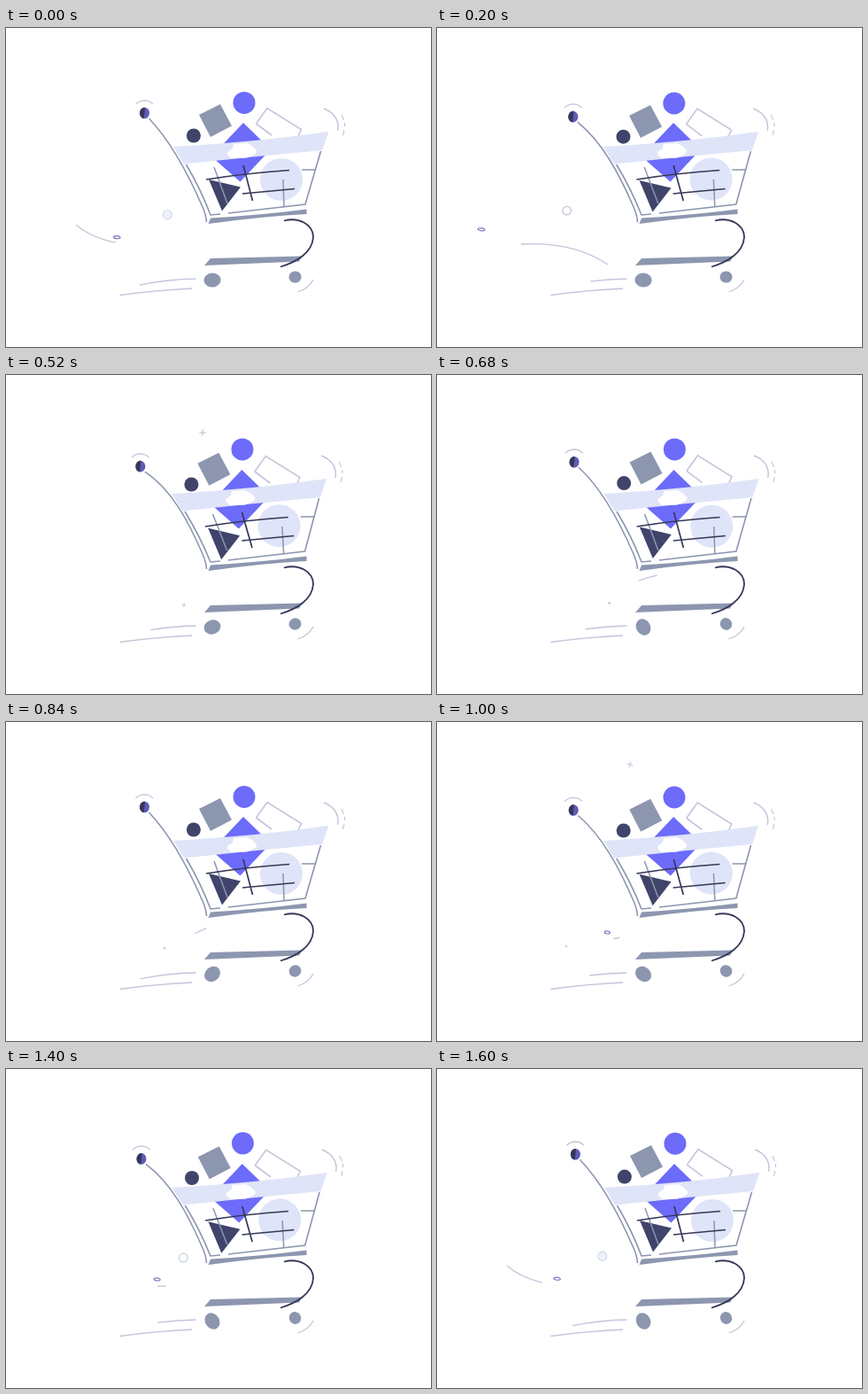
An HTML page with a canvas that plays this animation: 480 by 360 pixels, repeating every 1.64 s.

```html
<!DOCTYPE html>
<html lang="en">
<head>
<meta charset="utf-8">
<title>Rolling cart</title>
<style>
html, body { margin: 0; overflow: hidden; background: #fff }
canvas { display: block }
</style>
</head>
<body>
<canvas id="stage" width="480" height="360"></canvas>
<script>
const ctx = document.getElementById('stage').getContext('2d');
const LOOP = 1640, TAU = Math.PI * 2;
const BLUE = '#6c6bfa', GREY = '#8c96af', DARK = '#40446a', INK = '#353857',
      PALE = '#dfe4f8', LILAC = '#c3c5da';

const fill = (color, d) => { ctx.fillStyle = color; ctx.fill(new Path2D(d)); };
const stroke = (color, width, d) => {
  ctx.strokeStyle = color;
  ctx.lineWidth = width;
  ctx.stroke(new Path2D(d));
};
const ellipse = (x, y, rx, ry = rx, angle = 0, from = 0, to = TAU) => {
  ctx.beginPath();
  ctx.ellipse(x, y, rx, ry, angle, from, to);
};
const disc = (color, ...shape) => { ellipse(...shape); ctx.fillStyle = color; ctx.fill(); };
const ring = (color, width, ...shape) => {
  ellipse(...shape);
  ctx.strokeStyle = color;
  ctx.lineWidth = width;
  ctx.stroke();
};
const at = (x, y, draw) => { ctx.save(); ctx.translate(x, y); draw(); ctx.restore(); };

// Progress since `start`, wrapped around the loop; 1 or more means finished
const life = (t, start, length) => ((t - start + LOOP) % LOOP) / length;
const drift = u => .45 * u ** 2 + .55 * u ** 4;
const pulse = (t, a, b) => t > a && t < b ? Math.sin(Math.PI * (t - a) / (b - a)) : 0;

// keys: [time, from, to], with from and to as fractions of the path
function trail(t, d, length, keys) {
  const i = keys.findIndex(k => k[0] > t);
  if (i < 1) return;
  const [p, q] = [keys[i - 1], keys[i]], u = (t - p[0]) / (q[0] - p[0]);
  const from = p[1] + (q[1] - p[1]) * u, to = p[2] + (q[2] - p[2]) * u;
  if (to - from < .005) return;
  ctx.setLineDash([(to - from) * length, 999]);
  ctx.lineDashOffset = -from * length;
  stroke(LILAC, 1.3, d);
  ctx.setLineDash([]);
  ctx.lineDashOffset = 0;
}

function plus(x, y, size, angle) {
  if (size < .3) return;
  at(x, y, () => {
    ctx.rotate(angle);
    stroke(LILAC, 1.2, `M${-size} 0H${size}M0 ${-size}V${size}`);
  });
}

function particles(t) {
  const late = t < 480 ? t + LOOP : t;
  trail(late, 'M249 226C228 230 215 238 204 244C180 246 155 245 138 245C115 241 95 236 79 222', 184,
    [[640, 0, 0], [680, 0, .12], [1000, .25, .29], [1400, .39, .44],
     [1600, .73, 1], [1640, .7, 1], [1780, 1, 1]]);
  trail(t, 'M193 267C165 248 130 242 95 244', 103, [[60, 0, 0], [190, 0, 1], [240, 0, 1], [400, 1, 1]]);

  const u = life(t, 950, 910);
  if (u < 1) {
    const x = 192.5 - 152 * drift(u), y = 237.5 - 12 * u ** 8;
    ring('#7a77c0', 1.2, x, y, 3 + u, 1.5, .12);
  }
  const v = life(t, 1200, 900);
  if (v < 1 && v > .12) {
    const e = drift(v);
    ring(v > .6 ? '#c4c8d4' : '#c5d3e3', 1.3, 204 - 155 * e, 213.5 - 20 * e, 4.8);
    if (v > .4 && v < .55) disc('#eef2fa', 204 - 155 * e, 213.5 - 20 * e, 4.4);
  }
  const s = life(t, 420, 700);
  if (s < 1) plus(202 - 98 * drift(s), 261 - 9.5 * s, 2.2 - 1.3 * s, .2);

  const rise = (t - 520) / 480;
  plus(222 - 4 * rise, 65 - 17 * rise, 3.6 * (pulse(t, 400, 640) + pulse(t, 880, 1120)), .1 + .25 * rise);
}

function goods(w, sway) {
  disc(BLUE, 267.75 + 1.25 * w, 84.4 + .6 * sway, 12.5);
  at(w - 1, 1 - w, () => fill(GREY, 'M218 98L242 86L255 110.5L231 123Z'));
  disc(DARK, 210.4 + 1.5 * w, 122.7 - 1.2 * w, 8);
  at(w - 1, (1 - w) * .6, () => stroke(LILAC, 1.6, 'M282.5 108L295 90.5L333.5 114.5L330 122M282.5 108L300 121'));
  at(w - 1, 0, () => fill(BLUE, 'M268 107L299 137L264.5 173.5L232 145Z'));
  disc(PALE, 309.5 + 1.5 * w, 170.5 + .5 * w, 24);
  at((w - 1) * .5, 1 - w, () => fill(DARK, 'M229 171L265 179.5L244 206.5Z'));
}

function basket(w) {
  ctx.save();
  const shear = .0153 * (w - 1);
  ctx.transform(1, 0, -shear, 1, shear * 215, 0);
  fill(PALE, 'M189 134Q280 129 364.5 117L357 138Q280 145 201 153.5Z');
  fill('#fff', 'M257 131L272 130L278 133L283 138L283 141L278 144L272 146.5L255 147L250 143L250 140L256 136Z');
  stroke(GREY, 1.6, 'M355.5 139L338 199L251 209M203.5 154Q220 182 231 211L242 210');
  stroke(GREY, 1.5, 'M235 157L250 198M313 171L314 202M334 160H350');
  stroke(INK, 1.7, 'M226 171Q270 164 320 160.5M267 187L326 181.5M268 155L278.5 195');
  stroke(LILAC, 1.4, 'M359 91C370 95 377 104 374.5 116');
  stroke(LILAC, 1.1, 'M379 98L381.5 104M382.5 107V111M382 115L380.5 121');
  ctx.restore();
}

function handle(w) {
  const x = 153.7 + 2.8 * w, y = 100.3 - 4.3 * w;
  stroke(GREY, 1.6, `M${x + 5} ${y + 6}C187 129 206 165 222 202Q226 211 226.5 219`);
  at(x, y, () => {
    disc('#5f5cb8', 0, 0, 5.5, 6.3);
    disc(INK, 0, 0, 5.5, 6.3, .1, Math.PI / 2, Math.PI * 1.5);
    stroke(LILAC, 1.3, 'M-10 -10Q-6 -14 0 -14.2Q6 -14 9.5 -10');
  });
}

function base(p) {
  fill(GREY, 'M231 214.5Q290 211 339.5 204.5V210Q285 213 228.5 221Z');
  fill(GREY, 'M231 260L334.5 257.5L331 263.5L224 268Z');
  stroke(INK, 1.8, 'M314 217.5C331 213 347 222 347 236C346 253 329 264 310 269.5');
  const spin = Math.PI * 25 * p - .15;
  disc(GREY, 233, 284.5, 9.6, 8, spin);
  disc(GREY, 326.5, 281, 7, 6.6, spin);
  stroke(LILAC, 1.3, 'M347 284Q342 294 329.5 298');

  // Speed lines; the upper one changes length
  const start = 162 - 11 * Math.cos(TAU * 4 * p);
  stroke(LILAC, 1.3, 'M128.5 301.5Q168 296 210 294');
  stroke(LILAC, 1.4, `M${start} ${290 - (start - 151) * .19}Q${(start + 214) / 2} 283.5 214.5 283`);
}

function frame(now) {
  const t = now % LOOP, p = t / LOOP, w = Math.cos(TAU * 2 * p);
  ctx.fillStyle = '#fff';
  ctx.fillRect(0, 0, 480, 360);
  particles(t);
  goods(w, Math.sin(TAU * 2 * p));
  basket(w);
  handle(w);
  base(p);
  requestAnimationFrame(frame);
}
frame(0);
</script>
</body>
</html>
```
